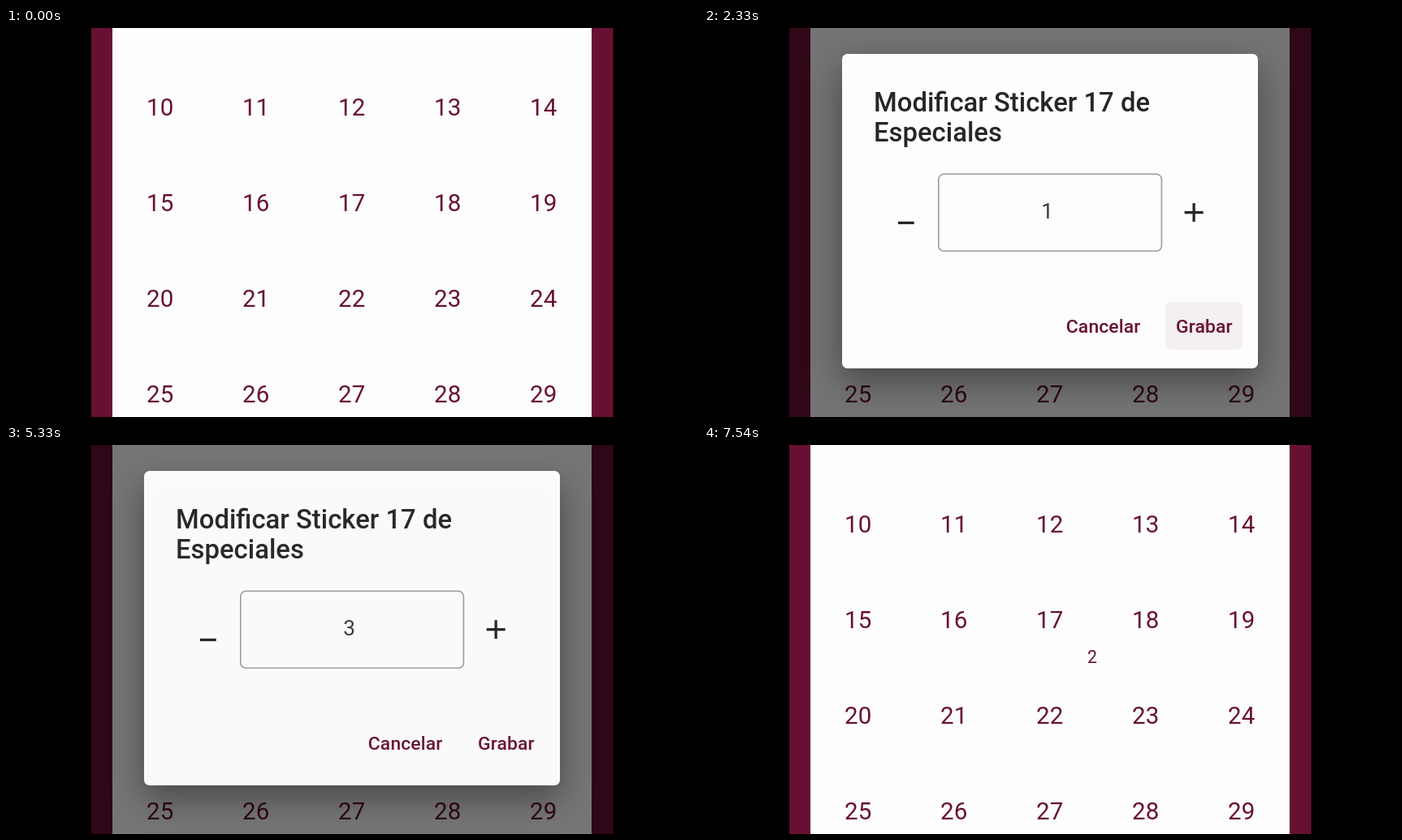
These frames come from a looping animation (852x480 px, 7580 ms). An HTML page with a canvas:

```html
<!DOCTYPE html>
<html lang="es">
<head>
<meta charset="utf-8">
<title>Stickers</title>
<style>
html, body { margin: 0; height: 100%; overflow: hidden; background: #000; }
canvas { display: block; }
</style>
</head>
<body>
<canvas id="stage" width="852" height="480"></canvas>
<script>
const LOOP = 7580;
const PAGE = '#fdfdfd';
const MAROON = '#681034';
const INK = '#262626';
const ctx = document.getElementById('stage').getContext('2d');

const clamp = x => Math.max(0, Math.min(1, x));
const ramp = (t, from, length) => clamp((t - from) / length);
const easeOut = x => 1 - (1 - x) ** 2;

// Times of touch down and up
const cellPresses = [[15, 590], [3270, 3590], [4150, 4260], [4790, 5340]];
const plusPress = [920, 940];
const minusPress = [5610, 6137];
const savePresses = [[2235, 2520], [7030, 7215]];
const dialogs = [
  { open: 430, close: 2520, changeAt: 940, before: 0, after: 1 },
  { open: 5200, close: 7215, changeAt: 6137, before: 3, after: 2 }
];
const counts = [[7215, 2], [4260, 3], [3590, 2], [2520, 1]];

function text(str, x, y, size, color, align = 'center', weight = 400) {
  ctx.font = `${weight} ${size}px Roboto, sans-serif`;
  ctx.textAlign = align;
  ctx.fillStyle = color;
  ctx.fillText(str, x, y);
}

function box(x, y, w, h, r) {
  ctx.beginPath();
  ctx.roundRect(x, y, w, h, r);
}

function disc(x, y, r) {
  ctx.beginPath();
  ctx.arc(x, y, r, 0, 7);
}

// Touch feedback: a highlight that fades in plus a splash growing inside the shape.
// The splash creeps while held and rushes to its full radius on release.
function ripple(t, [down, up], shape, x, y, radius, colors = ['188,188,188', '200,200,200'], alpha = 0.4) {
  if (t < down || t > up + 200) return;
  const held = Math.min(t, up) - down;
  const fade = 1 - ramp(t, up, 200);
  const r = Math.min(radius, radius * held / 1000 + Math.max(0, t - up) * 1.64);
  ctx.save();
  shape();
  ctx.clip();
  ctx.fillStyle = `rgba(${colors[0]},${alpha * clamp(held / 200) * fade})`;
  ctx.fill();
  disc(x, y, r);
  ctx.fillStyle = `rgba(${colors[1]},${alpha * fade})`;
  ctx.fill();
  ctx.restore();
}

function drawGrid(t) {
  ctx.fillStyle = '#000';
  ctx.fillRect(0, 0, 852, 480);
  ctx.fillStyle = MAROON;
  ctx.fillRect(105, 0, 642.5, 480);
  ctx.fillStyle = PAGE;
  ctx.fillRect(131, 0, 590, 480);
  for (const press of cellPresses) {
    ripple(t, press, () => box(367.5, 155, 118, 118, 0), 450, 224, 107);
  }
  for (let i = 0; i < 20; i++) {
    text(10 + i, 189.7 + i % 5 * 118, 107.5 + Math.floor(i / 5) * 118, 29.5, MAROON);
  }
  const count = counts.find(c => t >= c[0]);
  if (count) text(count[1], 478, 269, 21.3, MAROON);
}

function drawDialog(t, d) {
  const shown = easeOut(ramp(t, d.open, 150)) * (1 - ramp(t, d.close, 150) ** 2);
  if (shown <= 0) return;
  ctx.save();
  ctx.globalAlpha = shown;
  ctx.fillStyle = 'rgba(0,0,0,.54)';
  ctx.fillRect(105, 0, 643, 480);

  ctx.save();
  ctx.shadowColor = 'rgba(0,0,0,.4)';
  ctx.shadowBlur = 42;
  ctx.shadowOffsetY = 16;
  ctx.fillStyle = PAGE;
  box(170, 32, 512, 388, 6.5);
  ctx.fill();
  ctx.restore();

  text('Modificar Sticker 17 de', 209, 103, 32.8, INK, 'left', 500);
  text('Especiales', 209, 140.3, 32.8, INK, 'left', 500);

  ripple(t, minusPress, () => disc(249, 227.5, 57.4), 249, 227.5, 57.4);
  ripple(t, plusPress, () => disc(603, 227.5, 57.4), 603, 227.5, 57.4);
  for (const press of savePresses) {
    ripple(t, press, () => box(568, 338, 95, 59, 6.5), 616, 368, 56, ['104,16,52', '104,16,52'], 0.12);
  }

  ctx.strokeStyle = '#9c9c9c';
  ctx.lineWidth = 1.6;
  box(288.8, 180.3, 274.6, 95, 6.5);
  ctx.stroke();
  text(t < d.changeAt ? d.before : d.after, 422.7, 235, 26.2, '#383838');

  ctx.fillStyle = INK;
  ctx.fillRect(239, 238.8, 19.7, 3.3);
  ctx.fillRect(591.7, 226, 23, 3.3);
  ctx.fillRect(601.5, 216.1, 3.3, 23);

  ctx.letterSpacing = '0.12px';
  text('Cancelar', 445.8, 376, 22.9, MAROON, 'left', 500);
  text('Grabar', 581, 376, 22.9, MAROON, 'left', 500);
  ctx.restore();
}

function frame(now) {
  const t = now % LOOP;
  drawGrid(t);
  for (const d of dialogs) drawDialog(t, d);
  requestAnimationFrame(frame);
}
requestAnimationFrame(frame);
</script>
</body>
</html>
```
